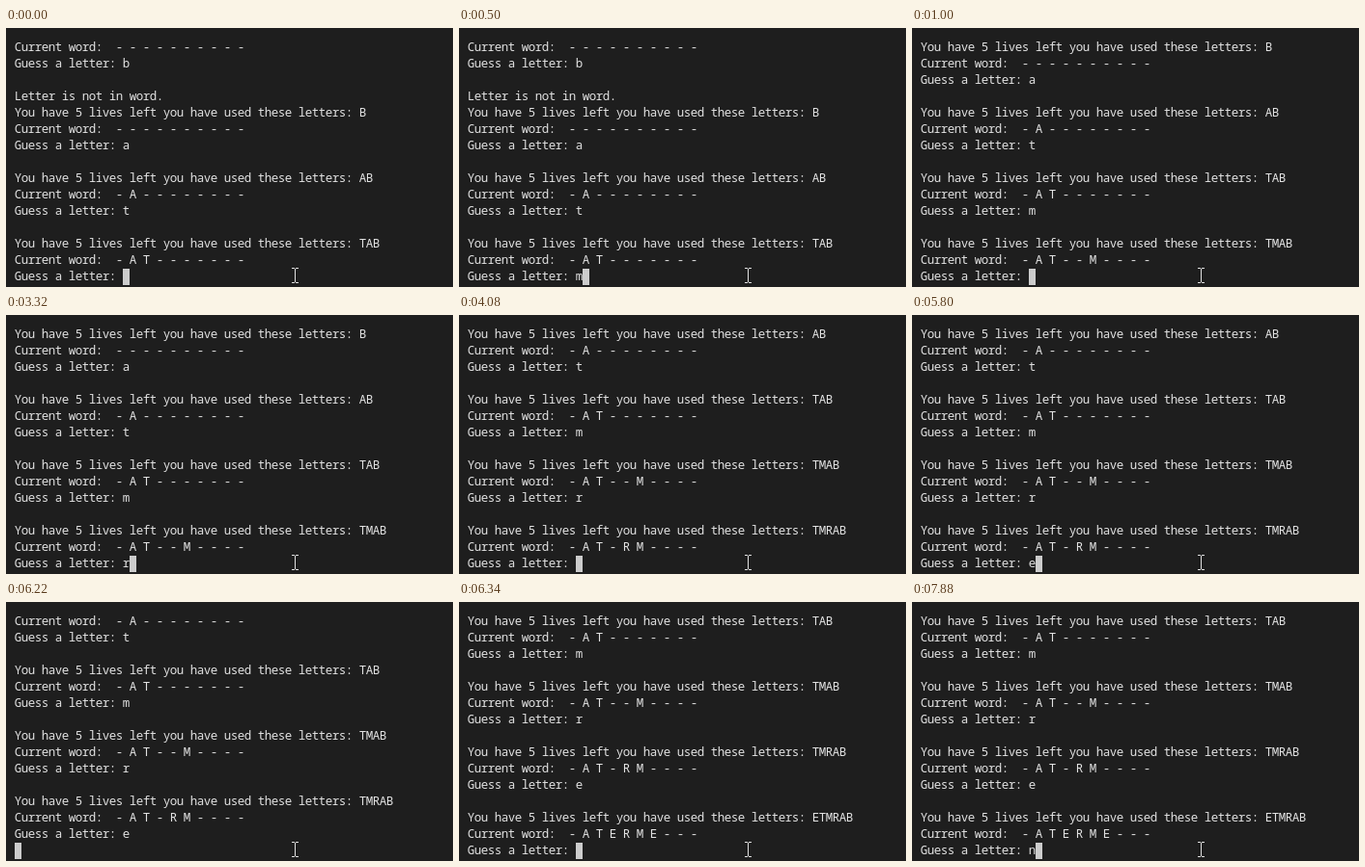
An HTML page with a canvas for the animation above (8000 ms loop, 463 by 269 pixels).

```html
<!DOCTYPE html>
<html lang="en">
<head>
<meta charset="utf-8">
<title>Word guessing game</title>
<style>
  html, body { margin: 0; width: 100%; height: 100%; overflow: hidden; background: #1e1e1e; }
  canvas { display: block; }
</style>
</head>
<body>
<canvas id="stage" width="463" height="269"></canvas>
<script>
const ctx = document.getElementById('stage').getContext('2d');
const LOOP = 8000;
const ROWS = 15, CELL = 7, PITCH = 17, LEFT = 9, TOP = 12, BASELINE = 12;
const PROMPT = 'Guess a letter: ';

// Letters used, word so far, next guess
const rounds = [
  ['B', '----------', 'a'],
  ['AB', '-A--------', 't'],
  ['TAB', '-AT-------', 'm'],
  ['TMAB', '-AT--M----', 'r'],
  ['TMRAB', '-AT-RM----', 'e'],
  ['ETMRAB', '-ATERME---', 'n']
];

const wordLine = word => 'Current word:  ' + [...word].join(' ');

const log = [wordLine('----------'), PROMPT + 'b', '', 'Letter is not in word.'];
for (const [used, word, guess] of rounds) {
  log.push('You have 5 lives left you have used these letters: ' + used,
    wordLine(word), PROMPT + guess, '');
}

// Start time, round, and what the player has done: wait, type or enter
const steps = [
  [0, 2, 'wait'],
  [500, 2, 'type'],
  [1000, 3, 'wait'],
  [3320, 3, 'type'],
  [3960, 3, 'enter'],
  [4080, 4, 'wait'],
  [5800, 4, 'type'],
  [6220, 4, 'enter'],
  [6340, 5, 'wait'],
  [7880, 5, 'type']
];

// Terminal text: every character sits in the middle of its cell
function drawLine(line, row) {
  const y = TOP + BASELINE + row * PITCH;
  [...line].forEach((char, column) =>
    ctx.fillText(char, LEFT + (column + 0.5) * CELL, y));
}

function drawPointer() {
  ctx.fillStyle = '#e0e0e0';
  for (const y of [249, 264]) {
    ctx.fillRect(296, y, 3, 1);
    ctx.fillRect(300, y, 3, 1);
  }
  ctx.fillRect(299, 250, 1, 14);
}

function draw(time) {
  const [, round, action] = steps.filter(s => s[0] <= time).pop();
  const last = 6 + 4 * round + (action === 'enter' ? 1 : 0);
  const lines = log.slice(last - ROWS + 1, last + 1);
  if (action === 'wait') lines[ROWS - 1] = PROMPT;

  ctx.fillStyle = '#1e1e1e';
  ctx.fillRect(0, 0, 463, 269);

  ctx.fillStyle = '#e2e2e2';
  ctx.font = '12.5px "Noto Sans Mono", "DejaVu Sans Mono", monospace';
  ctx.textAlign = 'center';
  ctx.textBaseline = 'alphabetic';
  lines.forEach(drawLine);

  ctx.fillStyle = '#cccccc';
  const column = lines[ROWS - 1].length;
  ctx.fillRect(LEFT + column * CELL, TOP + (ROWS - 1) * PITCH, CELL, PITCH);
  drawPointer();
}

function tick() {
  draw(performance.now() % LOOP);
  requestAnimationFrame(tick);
}
tick();
</script>
</body>
</html>
```
